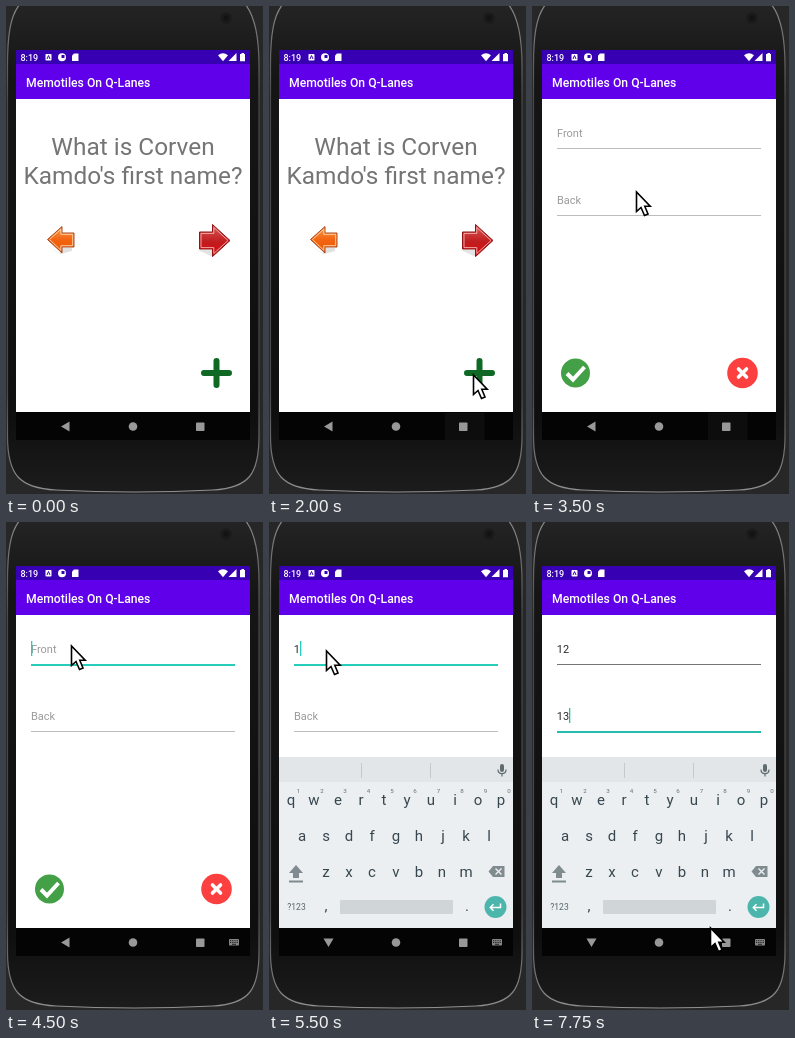
An HTML page for the animation above (8 s loop, 257 px wide and 488 px high).

```html
<!DOCTYPE html>
<html lang="en">
<head>
<meta charset="utf-8">
<title>Flash card app</title>
<style>
html, body { margin: 0; width: 100%; height: 100%; overflow: hidden; background: #272727; }
svg { display: block; width: 100vw; height: 100vh; }
text { font-family: Roboto, "Noto Sans", sans-serif; }
.mid { text-anchor: middle; }
.title { font-size: 12.2px; font-weight: 500; fill: #fff; }
.question { font-size: 24.4px; fill: #757575; }
.field { font-size: 11px; fill: #2b2b2b; }
.hint { font-size: 11px; fill: #9b9b9b; }
.keys { font-size: 15px; fill: #37474f; }
.digits { font-size: 6.2px; fill: #607078; }

/* every change is a hard cut on a 250 ms grid (3.125 %) */
.a { animation: 8s step-end -15ms infinite; }
.hid { opacity: 0; }
.old { animation-name: old; transform-origin: 127px 240px; }
.new { animation-name: new; transform-origin: 127px 235px; }
.kb { animation-name: kb; }
.kbIcon { animation-name: kbIcon; }
.glow { animation-name: glow; }
.back { animation-name: back; transform-origin: 59.5px 420.5px; }
.hintA { animation-name: hintA; }
.hintB { animation-name: hintB; }
.a1 { animation-name: a1; }
.a2 { animation-name: a2; }
.b1 { animation-name: b1; }
.b2 { animation-name: b2; }
.lineA { animation-name: lineA; }
.lineB { animation-name: lineB; }
.caretA { animation-name: caretA; }
.caretB { animation-name: caretB; }
.mouse { animation-name: mouse; }

@keyframes old { 37.5% { transform: scale(1.031, 1.027); } 40.625% { opacity: 0; } }
@keyframes new {
  37.5% { opacity: .5; transform: scale(.936); }
  40.625% { opacity: 1; transform: none; }
}
@keyframes glow { 6.25% { opacity: 1; } 53.125% { opacity: 0; } }
@keyframes kbIcon { 53.125% { opacity: 1; } }
@keyframes kb { 59.375% { opacity: 1; } }
@keyframes back { 62.5% { transform: rotate(-90deg); } }
@keyframes hintA { 68.75% { opacity: 0; } }
@keyframes a1 { 68.75% { opacity: 1; } }
@keyframes a2 { 71.875% { opacity: 1; } }
@keyframes hintB { 84.375% { opacity: 0; } }
@keyframes b1 { 84.375% { opacity: 1; } }
@keyframes b2 { 87.5% { opacity: 1; } }
@keyframes lineA {
  53.125% { fill: #26cdbb; height: 2px; }
  78.125% { fill: #757575; height: 1px; }
}
@keyframes lineB { 78.125% { fill: #26bdac; height: 2px; } }
@keyframes caretA {
  53.125% { opacity: 1; }
  68.75% { transform: translateX(6px); }
  71.875% { transform: translateX(12px); }
  78.125% { opacity: 0; }
}
@keyframes caretB {
  78.125% { opacity: 1; }
  84.375% { transform: translateX(6px); }
  87.5% { transform: translateX(12px); }
}
@keyframes mouse {
  0% { transform: translate(210px, 500px); }
  6.25% { transform: translate(210px, 423px); }
  9.375% { transform: translate(207px, 396px); }
  12.5% { transform: translate(205px, 376px); }
  15.625%, 25% { transform: translate(204px, 369px); }
  34.375% { transform: translate(177px, 331px); }
  37.5% { transform: translate(161.5px, 292px); }
  40.625% { transform: translate(132px, 236px); }
  43.75% { transform: translate(104px, 186px); }
  46.875% { transform: translate(84px, 152px); }
  50% { transform: translate(72px, 132px); }
  53.125% { transform: translate(66px, 124px); }
  56.25% { transform: translate(65px, 124px); }
  59.375% { transform: translate(57px, 129px); }
  75% { transform: translate(52px, 165px); }
  78.125% { transform: translate(47px, 196px); }
  90.625% { transform: translate(78px, 246px); }
  93.75% { transform: translate(132px, 334px); }
  96.875% { transform: translate(178px, 406px); }
}
</style>
</head>
<body>
<svg viewBox="0 0 257 488" preserveAspectRatio="none">
  <defs>
    <linearGradient id="body" x2="0" y2="1">
      <stop stop-color="#242424"/><stop offset=".15" stop-color="#151515"/>
      <stop offset=".85" stop-color="#0f0f0f"/><stop offset="1" stop-color="#1c1c1c"/>
    </linearGradient>
    <linearGradient id="rim" x2="0" y2="1">
      <stop stop-color="#8a8a8a"/><stop offset=".2" stop-color="#484848"/>
      <stop offset=".8" stop-color="#484848"/><stop offset="1" stop-color="#909090"/>
    </linearGradient>
    <linearGradient id="orange" x2="0" y2="1">
      <stop stop-color="#ff9a48"/><stop offset=".5" stop-color="#f26412"/><stop offset="1" stop-color="#ee5a00"/>
    </linearGradient>
    <linearGradient id="red" x2="0" y2="1">
      <stop stop-color="#d65a58"/><stop offset=".55" stop-color="#c01c1e"/><stop offset="1" stop-color="#e00a10"/>
    </linearGradient>
    <clipPath id="screen"><path d="M10 44H244V434H10z"/></clipPath>
    <g id="chrome">
      <path fill="#fff" d="M10 93H244V406H10z"/>
      <path fill="#3700b3" d="M10 44H244V58H10z"/>
      <path fill="#6000ea" d="M10 58H244V93H10z"/>
      <path fill="#040404" d="M10 406H244V434H10z"/>
      <text class="title" x="20" y="80.5">Memotiles On Q-Lanes</text>
    </g>
  </defs>

  <!-- phone -->
  <path fill="#272727" d="M0 0H257V488H0z"/>
  <path fill="url(#body)" stroke="url(#rim)" stroke-width="1.200" d="M14-2C4 10 1.500 30 1.500 60V430C1.500 470 14 482 50 484Q128 488 207 484C243 482 253 468 253 430V60C253 30 249 10 239-2z"/>
  <circle cx="220" cy="12" r="5.500" fill="#1a1a1a"/><circle cx="220" cy="12" r="2.500" fill="#131316"/>

  <g clip-path="url(#screen)">
    <!-- question page -->
    <g class="a old">
      <use href="#chrome"/>
      <g class="question mid">
        <text x="127" y="149">What is Corven</text>
        <text x="127" y="178">Kamdo's first name?</text>
      </g>
      <path fill="#c8c8c8" opacity=".55" d="M40 239L54 248V242H66V245L55 248z"/>
      <path fill="url(#orange)" stroke="#a84a22" d="M41.500 233.500L56 220.500V227H68V241H56V247z"/>
      <path fill="none" stroke="#ffd9ae" stroke-width=".9" d="M43.500 233.500L54.800 223.300V228.300H66.700V239.700H54.800V244.300z"/>
      <path fill="#c8c8c8" opacity=".5" d="M192 244H206V250L222 238L207 251z"/>
      <path fill="url(#red)" stroke="#8e1114" d="M224 234.500L206.500 218.500V226H193.500V243H206.500V250.500z"/>
      <path fill="none" stroke="#f6b4b0" stroke-width=".9" d="M222 234.500L207.800 221.500V227.400H195V241.600H207.800V247.500z"/>
      <path stroke="#0f6823" stroke-width="6" stroke-linecap="round" d="M198 367H223M210.500 355V379"/>
    </g>

    <!-- new card page -->
    <g class="a new hid">
      <use href="#chrome"/>
      <text class="hint a hintA" x="25" y="130.500">Front</text>
      <g class="field">
        <text class="a a1 hid" x="24.800" y="130.500">1</text>
        <text class="a a2 hid" x="31" y="130.500">2</text>
        <text class="a b1 hid" x="24.800" y="198">1</text>
        <text class="a b2 hid" x="31" y="198">3</text>
      </g>
      <text class="hint a hintB" x="25" y="198">Back</text>
      <rect class="a lineA" x="25" y="142" width="204" height="1" fill="#bdbdbd"/>
      <rect class="a lineB" x="25" y="209" width="204" height="1" fill="#bdbdbd"/>
      <rect class="a caretA hid" x="25" y="119" width="1.300" height="15" fill="#26cdbb"/>
      <rect class="a caretB hid" x="25" y="186" width="1.300" height="15" fill="#26bdac"/>
      <circle cx="43.500" cy="367" r="14.500" fill="#43a047"/>
      <path fill="none" stroke="#fff" stroke-width="4" d="M35 367.500L41 373.500L52.500 361"/>
      <circle cx="210.500" cy="367" r="15.300" fill="#fc3f3f"/>
      <path stroke="#fff" stroke-width="3.600" stroke-linecap="round" d="M206.500 363L214.500 371M214.500 363L206.500 371"/>
    </g>

    <!-- keyboard -->
    <g class="a kb hid">
      <path fill="#eceff1" d="M10 235H244V406H10z"/>
      <path fill="#e2e6e8" d="M10 235H244V260H10z"/>
      <path stroke="#c3c9cc" d="M92.500 241V256M161.500 241V256"/>
      <rect x="231" y="242" width="4" height="8" rx="2" fill="#5f6b70"/>
      <path fill="none" stroke="#5f6b70" stroke-width="1.200" d="M229 247.500C229 253 237 253 237 247.500M233 251.500V254.500"/>
      <g class="keys mid">
        <text x="22 45 69 92 115 138 162 186 209 232" y="283">qwertyuiop</text>
        <text x="33 57 80 103 127 150 174 197 220" y="319">asdfghjkl</text>
        <text x="57 80 103 127 150 173 197" y="355">zxcvbnm</text>
        <text x="57 198" y="389">,.</text>
      </g>
      <text class="digits mid" x="29.500 53 76 99.500 123 146 169.500 193 216.500 240" y="270.500">1234567890</text>
      <text class="mid" x="27.500" y="388" font-size="8.500" fill="#55646b">?123</text>
      <path fill="#808b90" d="M27 343L34 351H30V356H24V351H20zM20 358.500H34V360.500H20z"/>
      <path fill="#808b90" d="M219.500 349.500L224 344H235.500V355H224z"/>
      <path stroke="#eceff1" stroke-width="1.400" d="M226.500 346.500L232.500 352.500M232.500 346.500L226.500 352.500"/>
      <rect x="71" y="378" width="113" height="14" rx="1" fill="#d0d5d8"/>
      <circle cx="226.500" cy="385" r="11" fill="#4db6ac"/>
      <path fill="none" stroke="#fff" stroke-width="1.500" d="M231.500 381.500V385.500H221.500M224.500 382.300L221.300 385.500L224.500 388.700"/>
    </g>
  </g>

  <!-- status bar -->
  <g fill="#fff">
    <text x="14.500" y="54.700" font-size="9" font-weight="500">8:19</text>
    <rect x="39.500" y="48" width="6" height="6.500" rx=".8"/>
    <circle cx="56" cy="51.200" r="4"/>
    <path d="M68 47.500H72.500V55H66V49.500z"/>
    <path d="M212 49.200Q217 45.500 222 49.200L217 55.200z"/>
    <path d="M230.500 47V55H222.500z"/>
    <path d="M235.500 47H238V48H239V55.200H234V48H235.500z"/>
  </g>
  <path fill="none" stroke="#3700b3" d="M41 53L42.500 49.500L44 53"/>
  <path fill="#3700b3" d="M55.500 49H58.500V52H55.500z"/>

  <!-- navigation bar -->
  <path class="a glow hid" fill="#0d0d0d" d="M176 407H215.500V434H176z"/>
  <g fill="#989898">
    <path class="a back" d="M55 420.500L63.500 415.500V425.500z"/>
    <circle cx="127" cy="420.500" r="4.300"/>
    <rect x="190" y="416.500" width="8.500" height="8.500" rx=".8"/>
    <g class="a kbIcon hid">
      <rect x="223" y="417" width="10" height="6.500" rx=".8" fill="#858585"/>
      <path stroke="#111" stroke-width=".9" stroke-dasharray="1 .8" d="M224 418.700H232M224 420.500H232"/>
      <path stroke="#111" stroke-width=".8" d="M226 422.300H230"/>
    </g>
  </g>

  <path class="a mouse" fill="#fff" stroke="#000" stroke-width="1.600" d="M.5 0V19.500L5 15.500L8.500 23.500L12 22L8.800 14.300H14.200z"/>
</svg>
</body>
</html>
```
